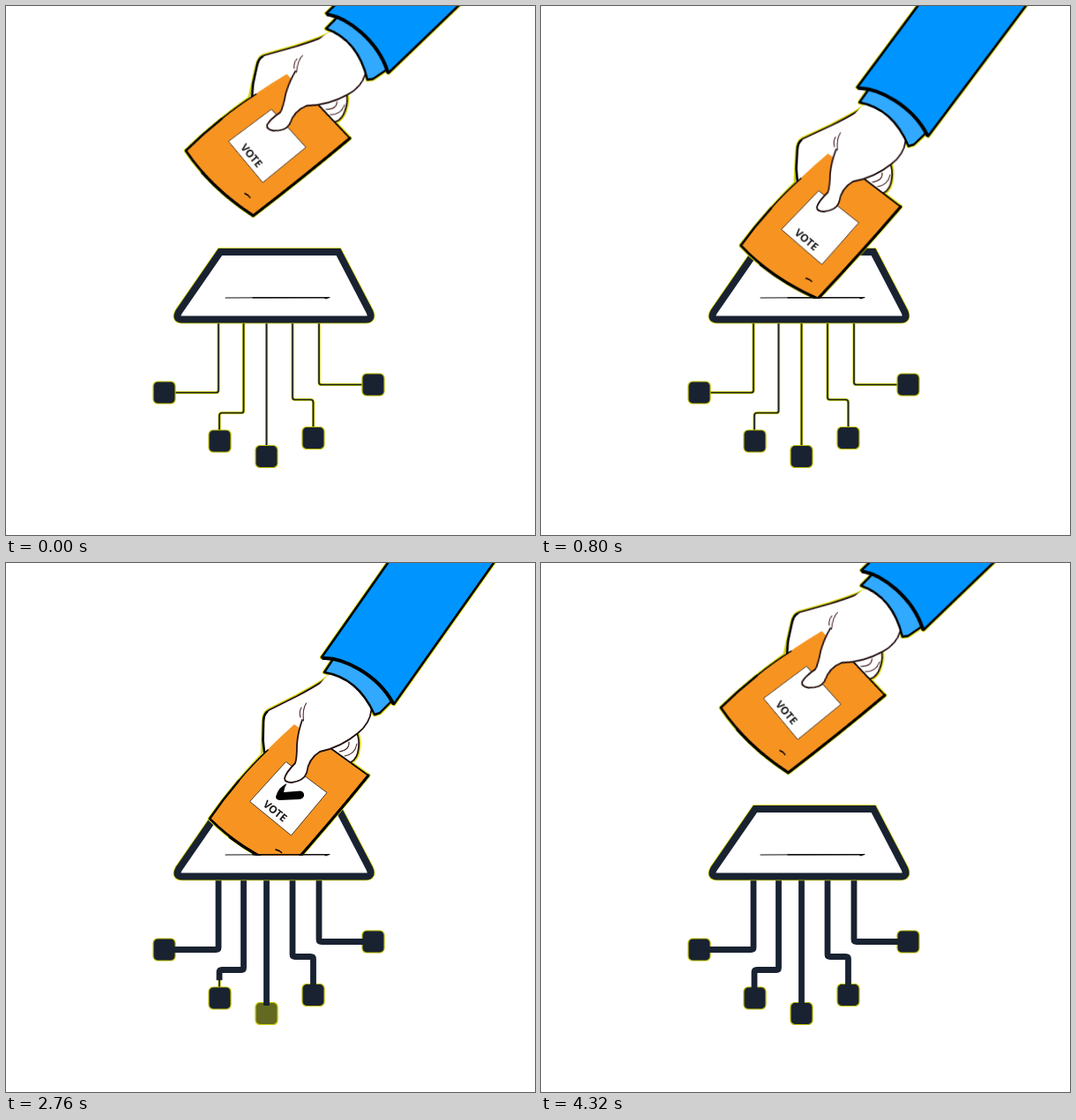
Recreate the animation shown at these times as an HTML page. Size 600x600 px, loop 4.36 s.

```html
<!DOCTYPE html>
<html lang="en">
<head>
<meta charset="utf-8">
<title>Digital vote</title>
<style>
html, body { margin: 0; width: 100%; height: 100%; overflow: hidden; background: #fff; }
svg { display: block; width: 100vw; height: 100vh; }
.line, .rim { fill: none; }
.line, .rim, .pen { stroke-linejoin: round; stroke-linecap: round; }

.rim { stroke: #d6d600; stroke-width: 4.6; }
.ink { stroke: #000; stroke-width: 2.6; }
.skin { stroke: #24100f; stroke-width: 1.8; }
.crease { stroke: #4a2328; stroke-width: 1.1; }
.white { fill: #fff; }
.blue { fill: #0094ff; }
.sky { fill: #30a9ff; }
.orange { fill: #f79421; }
.node { fill: #192231; stroke: #b9b900; stroke-width: 1.2; }
.glow { fill: #ff0; stroke: #ff0; opacity: 0; }
.wire { fill: none; stroke: #192231; stroke-width: 1.7; }
.edge { stroke: #d0d000; stroke-width: 3.2; }
.thick { stroke-width: 6.8; stroke-dasharray: 1 2; stroke-dashoffset: 1; }
.pen { fill: none; stroke: #fff; stroke-width: 26; stroke-linecap: butt; stroke-dasharray: 1 2; stroke-dashoffset: 1; }
text { font: 700 12px "Open Sans", Lato, sans-serif; fill: #1b1b1b; text-anchor: middle; }

.arm, .glow, .thick, .pen { animation: 4360ms linear infinite; }
.arm { animation-name: arm; }
.pen { animation-name: tick; }
.side { animation-name: side; }
.inL { animation-name: inL; }
.mid { animation-name: mid; }
.inR { animation-name: inR; }
.sideGlow { animation-name: sideGlow; }
.inLGlow { animation-name: inLGlow; }
.midGlow { animation-name: midGlow; }
.inRGlow { animation-name: inRGlow; }

/* the arm swings about the right corner of the envelope */
@keyframes arm {
  0%, 1.835%, 91.97%, 100% {
    transform: translate(390px, 150px) rotate(10.9deg) translate(-411px, -241px);
    animation-timing-function: cubic-bezier(.333, 0, .667, 1);
  }
  23.624%, 77.064% {
    transform: translate(411px, 241px) rotate(0deg) translate(-411px, -241px);
    animation-timing-function: cubic-bezier(.333, 0, .667, 1);
  }
}
@keyframes tick {
  0%, 26.6% { stroke-dashoffset: 1; }
  32.1%, 99.07% { stroke-dashoffset: 0; }
  99.08%, 100% { stroke-dashoffset: 1; }
}
@keyframes side { 0%, 25.57% { stroke-dashoffset: 1; } 42.2%, 100% { stroke-dashoffset: 0; } }
@keyframes inR { 0%, 22.94% { stroke-dashoffset: 1; } 40.37%, 100% { stroke-dashoffset: 0; } }
@keyframes mid { 0%, 25.96% { stroke-dashoffset: 1; } 53.76%, 100% { stroke-dashoffset: 0; } }
@keyframes inL {
  0%, 27.98% { stroke-dashoffset: 1; }
  50.46% { stroke-dashoffset: .36; }
  66.5%, 100% { stroke-dashoffset: 0; }
}
@keyframes sideGlow { 0%, 41.17% { opacity: 0; } 46.67% { opacity: 1; } 52.18%, 100% { opacity: 0; } }
@keyframes inRGlow { 0%, 40.1% { opacity: 0; } 45.6% { opacity: 1; } 51.1%, 100% { opacity: 0; } }
@keyframes midGlow { 0%, 54.13% { opacity: 0; } 59.63% { opacity: 1; } 65.14%, 100% { opacity: 0; } }
@keyframes inLGlow { 0%, 67.55% { opacity: 0; } 73.05% { opacity: 1; } 78.56%, 100% { opacity: 0; } }
</style>
</head>
<body>
<svg viewBox="0 0 600 600">
  <defs>
    <rect id="node" x="-12.5" y="-12.5" width="25" height="25" rx="5"/>
    <path id="w1" pathLength="1" d="M241 358 V436 Q241 438.5 238 438.5 H188"/>
    <path id="w2" pathLength="1" d="M269.5 358 V459 Q269.5 461.5 267 461.5 H245 Q242 461.5 242 464.5 V484"/>
    <path id="w3" pathLength="1" d="M295.5 358 V502"/>
    <path id="w4" pathLength="1" d="M325 358 V444 Q325 446.5 328 446.5 H345.5 Q348.5 446.5 348.5 449.5 V481"/>
    <path id="w5" pathLength="1" d="M355 358 V427 Q355 429.5 358 429.5 H408"/>
    <g id="wires">
      <use href="#w1"/><use href="#w2"/><use href="#w3"/><use href="#w4"/><use href="#w5"/>
    </g>
    <path id="box" d="M243 279 H377 L412.5 347 Q416 355.5 408 355.5 H200 Q191.5 355.5 196 347 Z"/>
    <path id="fist" d="M367 128 Q360 135 330 151 L298 167 Q292 171 292 180 L291 217 L330 225 L391 226 Q399 222 400 209 Q401 198 398 193 L413 165 Z"/>
    <path id="envelope" d="M231 290 Q273 231 327 183 L338 191 L365 208 L411 241 Q368 294 320 348 Q267 326 231 290 Z"/>
    <path id="cuff" d="M371 109 L361 124 Q399 130 418 172 L424 170 L437 157 Q415 112 371 109 Z"/>
    <path id="sleeve" d="M358 107 L475 -60 H595.4 L440 160 C420 124 380 106 358 107 Z"/>
    <clipPath id="slot"><rect width="600" height="331.5"/></clipPath>
    <mask id="stroke" maskUnits="userSpaceOnUse" x="290" y="235" width="65" height="50">
      <path class="pen" pathLength="1" d="M323 243 Q312 254 309 263 L345 261"/>
    </mask>
  </defs>

  <!-- circuit -->
  <use class="wire edge" href="#wires"/>
  <use class="wire" href="#wires"/>
  <use class="node" href="#node" x="179.5" y="438.5"/>
  <use class="node" href="#node" x="242.5" y="493.5"/>
  <use class="node" href="#node" x="295.5" y="511"/>
  <use class="node" href="#node" x="348.5" y="490"/>
  <use class="node" href="#node" x="416.5" y="429.5"/>
  <use class="glow sideGlow" href="#node" x="179.5" y="438.5"/>
  <use class="glow inLGlow" href="#node" x="242.5" y="493.5"/>
  <use class="glow midGlow" href="#node" x="295.5" y="511"/>
  <use class="glow inRGlow" href="#node" x="348.5" y="490"/>
  <use class="glow sideGlow" href="#node" x="416.5" y="429.5"/>
  <use class="wire thick side" href="#w1"/>
  <use class="wire thick inL" href="#w2"/>
  <use class="wire thick mid" href="#w3"/>
  <use class="wire thick inR" href="#w4"/>
  <use class="wire thick side" href="#w5"/>

  <!-- ballot box -->
  <use href="#box" fill="none" stroke="#d0d000" stroke-width="9.6"/>
  <use href="#box" fill="#fff" stroke="#192231" stroke-width="8"/>

  <g clip-path="url(#slot)">
    <g class="arm">
      <g class="rim">
        <use href="#fist"/><use href="#envelope"/><use href="#cuff"/><use href="#sleeve"/>
      </g>

      <!-- fist and fingers behind the envelope -->
      <use class="white" href="#fist"/>
      <path class="line skin" d="M367 128 Q360 135 330 151 L298 167 Q292 171 292 181"/>
      <path class="line ink" d="M296 169 Q292 172 292 181 L291.5 201 L293 215"/>
      <path class="line skin" d="M398 193 Q401 200 400 209 Q399 222 391 226"/>
      <path class="line crease" d="M398 205 Q396 217 384 219 M389 203 Q390 212 378 214"/>

      <!-- envelope -->
      <use class="orange" href="#envelope"/>
      <path class="line ink" d="M264 247 Q246 268 231 290 Q267 326 320 348 Q368 294 411 241"/>
      <path class="line" stroke="#000" stroke-width="3" d="M411 241 Q368 294 320 348 Q283 333 254 311"/>
      <path class="line" stroke="#000" stroke-width="1.6" d="M264 247 Q278 230 297 212 M368 210 L411 241 M306 325 L310 326.5 L312.5 328.5"/>
      <path class="white" stroke="#3b2a20" stroke-width=".9" d="M276.5 270.5 L323.5 309 L364 260.5 L317.5 225.5 Z"/>
      <text transform="translate(302.5 284.5) rotate(39)">VOTE</text>
      <path mask="url(#stroke)" d="M306 265 Q309 254 318.5 250 Q315.500 255 315 260 L334 258.500 Q338.500 259.500 338 264 Q337 267.500 333 268 L311 269 Q306 269 306 265 Z"/>

      <!-- thumb -->
      <path class="white" d="M364 128 L345 150 Q339 160 337 176 Q331 192 330 206 Q330 222 328 227 Q318 237 316 244 Q316 249 324 249 Q338 247 341 238 Q343 222 356 214 Q380 209 399 193 Q413 182 415 165 L390 118 Z"/>
      <path class="line skin" d="M336 178 Q331 192 330 206 Q330 222 328 227 Q318 237 316 244 Q316 249 324 249 Q338 247 341 238 Q343 222 356 214 Q380 209 399 193 Q413 182 414.5 166"/>
      <path class="line crease" d="M340.5 159 Q336 166 337.5 179 M335 164 Q332 169 334 175"/>

      <!-- cuff and sleeve -->
      <use class="sky" href="#cuff" stroke="#000" stroke-width="2.4" stroke-linejoin="round"/>
      <use class="blue" href="#sleeve"/>
      <path class="line ink" d="M475 -60 L358 107 M440 160 L595.4 -60"/>
      <path class="line" stroke="#000" stroke-width="4" d="M360 108 C382 107 421 126 439 159"/>
    </g>
  </g>

  <!-- slot -->
  <path class="line" stroke="#111" stroke-width="1.1" d="M249 331 L367 330.5"/>
  <path class="line" stroke="#111" stroke-width="1.5" d="M280 330.8 L366 330.8 M362 331.4 H364"/>
</svg>
</body>
</html>
```
